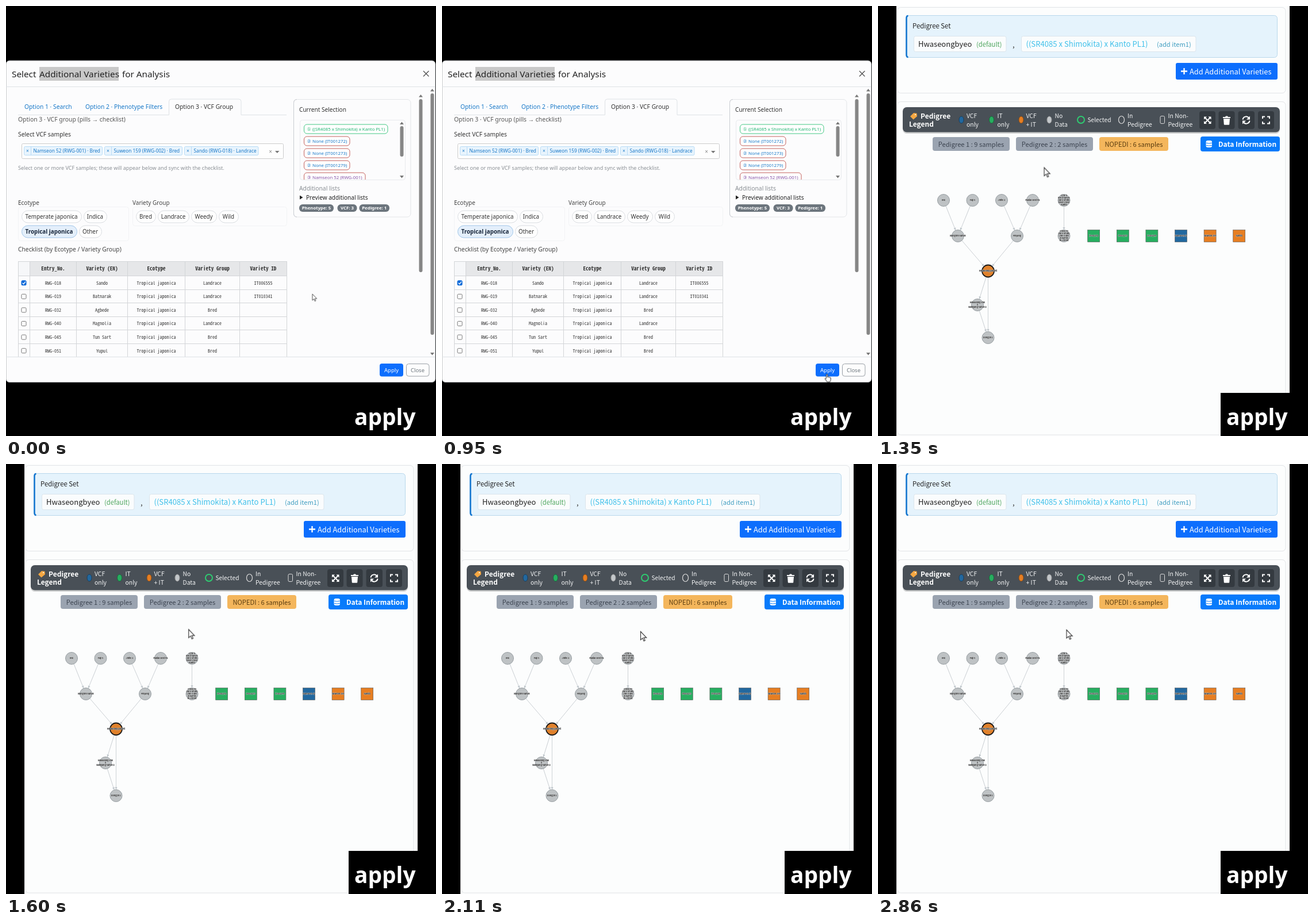
Animation, 748 px wide and 748 px high, one loop 2.88 s. Source, as an HTML page:

```html
<!DOCTYPE html>
<html lang="en">
<head>
<meta charset="utf-8">
<title>Apply varieties</title>
<style>
html, body { margin: 0; width: 100%; height: 100%; overflow: hidden; background: #000; }
svg { display: block; width: 100vw; height: 100vh; }
text { white-space: pre; }
.ui { font-family: 'Noto Sans', 'Open Sans', sans-serif; }
.kr { font-family: 'Noto Sans CJK KR', 'Noto Sans CJK JP', 'Noto Sans', sans-serif; }
.mono { font-family: 'Noto Sans Mono CJK KR', 'Noto Sans Mono CJK JP', 'Noto Sans Mono', monospace; }
#dialog, #tree, .pressed, #arrow, #hand, #pointer { animation: 2.88s linear infinite; }
#dialog { animation-name: leave; animation-timing-function: step-end; }
#tree { animation-name: enter; animation-timing-function: step-end; }
.pressed { animation-name: press; animation-timing-function: step-end; }
#arrow { animation-name: approach, arrowOff; animation-duration: 2.88s; animation-timing-function: linear, step-end; }
#hand { animation-name: handOn; animation-timing-function: step-end; }
#pointer { animation-name: wander; }
@keyframes leave { 0% { visibility: visible } 46.875%, 100% { visibility: hidden } }
@keyframes enter { 0% { visibility: hidden } 46.875%, 100% { visibility: visible } }
@keyframes press { 0% { opacity: 0 } 41.667%, 100% { opacity: 1 } }
@keyframes arrowOff { 0% { opacity: 1 } 24.306%, 100% { opacity: 0 } }
@keyframes handOn { 0% { opacity: 0 } 24.306%, 100% { opacity: 1 } }
@keyframes approach {
  0%, 3.47% { transform: translate(533px, 501px) }
  19.1% { transform: translate(678px, 597px) }
  24.306%, 100% { transform: translate(669px, 638px) }
}
@keyframes wander {
  0%, 46.875% { transform: translate(289px, 281px); animation-timing-function: ease-in-out }
  64.236% { transform: translate(346px, 294.5px); animation-timing-function: ease-in-out }
  83.681% { transform: translate(345px, 287.5px); animation-timing-function: ease-in-out }
  99.306%, 100% { transform: translate(328px, 288.5px) }
}
</style>
</head>
<body>
<svg id="stage" viewBox="0 0 748 748"></svg>
<script>
const esc = s => s.replace(/&/g, '&amp;').replace(/</g, '&lt;');

// Text is placed by the vertical middle of its capitals.
const text = (x, mid, s, size, fill = '#333', extra = '') =>
  `<text x="${x}" y="${mid + size * 0.36}" font-size="${size}" fill="${fill}" ${extra}>${esc(s)}</text>`;
const centered = (x, mid, s, size, fill, extra = '') =>
  text(x, mid, s, size, fill, 'text-anchor="middle" ' + extra);
const box = (x1, y1, x2, y2, fill = 'none', stroke = 'none', r = 0, extra = '') =>
  `<rect x="${x1}" y="${y1}" width="${x2 - x1}" height="${y2 - y1}" rx="${r}" fill="${fill}" stroke="${stroke}" ${extra}/>`;
const path = (d, stroke, width = 1, fill = 'none', extra = '') =>
  `<path d="${d}" stroke="${stroke}" stroke-width="${width}" fill="${fill}" ${extra}/>`;
const solid = (d, fill) => path(d, 'none', 0, fill);
const oval = (x, y, rx, ry, fill, stroke = 'none', width = 1) =>
  `<ellipse cx="${x}" cy="${y}" rx="${rx}" ry="${ry}" fill="${fill}" stroke="${stroke}" stroke-width="${width}"/>`;
const group = (cls, ...parts) => `<g class="${cls}">${parts.flat(9).join('')}</g>`;

const BOLD = 'font-weight="700"', MEDIUM = 'font-weight="500"';
const BLUE = '#0d6efd', LINK = '#1878c8', LINE = '#dee2e6';
const triangle = (x, y, dir) => solid(`M${x - 3.5} ${y + 2 * dir}h7l-3.5 ${-4.5 * dir}z`, '#777');
const thumb = (x1, y1, x2, y2) => box(x1, y1, x2, y2, '#868686', 'none', 3);

function header() {
  const title = fill => text(58, 118.5, 'Additional Varieties', 15.3, fill);
  return [
    box(0, 95, 747, 654.5, '#fcfcfd', '#9a9da0', 6),
    text(10, 118.5, 'Select ', 15.3, '#222'),
    box(58, 106, 196, 130, '#c8c8c8'), title('#222'),
    group('pressed', box(58, 106, 196, 130, '#3367d1'), title('#fff')),
    text(202, 118.5, 'for Analysis', 15.3, '#222'),
    path('M726 113l9.5 9.5m0-9.5l-9.5 9.5', '#555', 1.4),
    path('M0 140.5H746M0 610.5H746', LINE),
  ];
}

function filters() {
  const tag = (x1, x2, s) => [
    box(x1, 244.5, x2, 259.5, '#e8f4fd', '#b9dcf6', 2),
    path(`M${x1 + 12} 244.5v15`, '#b9dcf6'),
    centered(x1 + 6, 251.5, '×', 8.5, LINK), text(x1 + 16, 251.8, s, 8.25, LINK),
  ];
  const pill = (x1, x2, y, s, on) => [
    box(x1 + .5, y - 10.5, x2 + .5, y + 10.5, on ? '#e4effb' : '#fefefe', on ? '#9fc5e8' : '#d9dce0', 10.5),
    centered((x1 + x2) / 2, y, s, 9.85, on ? '#18263a' : '#333', on ? BOLD : ''),
  ];
  return [
    path('M21 189.5H283.5V166q0-4 4-4H405q4 0 4 4V189.5H488', LINE),
    text(32, 175.5, 'Option 1 · Search', 10.3, LINK),
    text(138, 175.5, 'Option 2 · Phenotype Filters', 10.3, LINK),
    text(294, 175.5, 'Option 3 · VCF Group', 10.3, '#333'),
    text(21, 197.5, 'Option 3 · VCF group (pills → checklist)', 10.4, '#555'),
    text(21, 223.5, 'Select VCF samples', 10.3),
    box(27.5, 239.5, 482.5, 265.5, '#fefefe', '#ccc', 2),
    tag(31.5, 167.5, 'Namseon 52 (RWG-001) · Bred'),
    tag(171.5, 306.5, 'Suweon 159 (RWG-002) · Bred'),
    tag(310.5, 439, 'Sando (RWG-018) · Landrace'),
    centered(460, 253, '×', 10, '#888'), solid('M468 252h7.5l-3.75 4z', '#777'),
    text(21, 282, 'Select one or more VCF samples; these will appear below and sync with the checklist.', 9.05, '#8a8f94'),
    text(21, 342, 'Ecotype', 10, '#444'), text(220, 342, 'Variety Group', 10, '#444'),
    box(21.5, 349.5, 213.5, 408.5, 'none', '#f2f3f5', 4), box(220.5, 349.5, 488.5, 382.5, 'none', '#f2f3f5', 4),
    pill(27, 131, 366.5, 'Temperate japonica'), pill(135, 175, 366.5, 'Indica'),
    pill(27, 123, 392.5, 'Tropical japonica', true), pill(127, 166, 392.5, 'Other'),
    pill(226, 260, 366.5, 'Bred'), pill(264, 318, 366.5, 'Landrace'),
    pill(322, 366, 366.5, 'Weedy'), pill(370, 404, 366.5, 'Wild'),
    text(21, 423, 'Checklist (by Ecotype / Variety Group)', 10.3, '#444'),
  ];
}

function table() {
  const cols = [21, 41, 122, 211, 311, 406, 488].map(x => x + .5);
  const heads = ['Entry_No.', 'Variety (EN)', 'Ecotype', 'Variety Group', 'Variety ID'];
  const rows = [
    ['018', 'Sando', 'Landrace', 'IT006555'], ['019', 'Batnarak', 'Landrace', 'IT010341'],
    ['032', 'Agbede', 'Bred', ''], ['040', 'Magnolia', 'Landrace', ''],
    ['045', 'Tun Sart', 'Bred', ''], ['051', 'Yupul', 'Bred', ''],
  ];
  const mid = i => (cols[i + 1] + cols[i + 2]) / 2;
  return group('mono',
    box(21, 444, 488, 469, '#e6e7e9'), box(21, 444, 41, 469, '#f6f7f9'),
    heads.map((s, i) => centered(mid(i), 456.5, s, 9.2, '#333', BOLD)),
    rows.map(([id, name, kind, code], r) => {
      const y = 481.7 + r * 23.6;
      return [
        ['RWG-' + id, name, 'Tropical japonica', kind, code].map((s, i) => centered(mid(i), y, s, 8, '#333')),
        box(27, y - 4, 35, y + 4, r ? '#fff' : '#0b69d8', r ? '#777' : '#0b69d8', 1.5),
        r ? '' : path(`M28.6 ${y}l2 2.1 3.2-4.3`, '#fff', 1.3),
      ];
    }),
    path('M21 444.5H488.5' + rows.map((_, r) => `M21 ${Math.round(469 + r * 23.6) + .5}H488.5`).join('') +
      cols.map(x => `M${x} 444V610`).join(''), '#d3d5d8'));
}

function selection() {
  const entry = (y, x2, mark, s, edge, color) => [
    box(518.5, y - 8, x2, y + 8, '#fefefe', edge, 5),
    centered(527, y, mark, 8, color), text(533, y, s, 7.8, color),
  ];
  const badge = (x1, x2, s) => [
    box(x1, 345, x2, 358, '#6c757d', 'none', 6),
    centered((x1 + x2) / 2, 351.5, s, 7.8, '#fff', BOLD),
  ];
  const red = '#c4625f';
  return [
    box(500.5, 162.5, 704, 367, '#fcfcfd', '#e3e5e8', 6), path('M506 162.5q-5.5 0-5.5 6V361q0 6 5.5 6', '#c9ccd1'),
    text(510, 180, 'Current Selection', 10.1),
    box(511.5, 198.5, 694.5, 302.5, 'none', '#e8eaed', 4),
    '<clipPath id="list"><rect x="511" y="198" width="184" height="104"/></clipPath><g clip-path="url(#list)">',
    entry(214, 664, '①', '((SR4085 x Shimokita) x Kanto PL1)', '#43c884', '#22b573'),
    [272, 273, 279].map((n, i) => entry(235 + i * 21, 598, '②', `None (IT001${n})`, red, LINK)),
    entry(298, 625, '③', 'Namseon 52 (RWG-001)', red, '#8550a6'),
    '</g>',
    triangle(688.5, 204, 1), thumb(685.5, 209, 691.5, 262), triangle(688.5, 297, -1),
    text(510, 317.5, 'Additional lists', 10.3, '#8a8f94'),
    solid('M511 329.5l5.5 3.5-5.5 3.5z', '#222'), text(522, 333, 'Preview additional lists', 10.05, '#222'),
    badge(510, 570, 'Phenotype: 5'), badge(576.5, 610.5, 'VCF: 3'), badge(614.5, 667, 'Pedigree: 1'),
    triangle(721.5, 156.5, 1), thumb(718.5, 162, 724.5, 463),
    triangle(741.5, 146.5, 1), thumb(738.5, 152, 744.5, 572), triangle(741.5, 605, -1),
  ];
}

const arrow = scale => `<g transform="scale(${scale})">` +
  path('M0 0V11.6L2.7 9.1 4.5 13.2 6.2 12.4 4.4 8.5H8.1Z', '#333', .9, '#fff') + '</g>';

const hand = `<g id="hand" transform="translate(665.5 639.5)">` +
  path('M3 8V1.5q1.2-1.6 2.2 0V6q1.4-.8 2 .3 1.4-.6 1.9.5 1.5-.4 1.6 1V10.500q-.5 2-1.500 4H4.500Q3 12 .8 9.300q-.5-1.800 2.200-.3', '#222', 1, '#fff') + '</g>';

function footer() {
  const apply = [
    box(650, 622, 691, 644.5, '#0957cb', 'none', 4), centered(670.5, 633.5, 'Apply', 9.5, '#fff'),
  ];
  return [
    box(650, 622, 691, 644.5, BLUE, 'none', 4), centered(670.5, 633.5, 'Apply', 9.5, '#fff'),
    group('pressed', apply),
    box(696.5, 622.5, 736, 644, '#fdfdfd', '#9aa0a6', 4), centered(716, 633.5, 'Close', 9.45, '#6c757d'),
    `<g id="arrow">${arrow(.95)}</g>`, hand,
  ];
}

function pedigreeSet() {
  return [
    box(32, 0, 716, 748, '#fcfdfd'),
    box(33.5, 2.5, 709, 151.5, 'none', '#e2e4e7', 6), box(33.5, 166.5, 709, 746, 'none', '#e2e4e7', 6),
    box(48.5, 16.5, 694.5, 89.5, '#e5f3fc', '#b9d8ec', 5),
    path('M52.500 17q-3 0-3 4V85q0 4 3 4', '#1878d0', 2.6),
    text(60, 34.5, 'Pedigree Set', 11.4, '#222', MEDIUM),
    box(62.5, 52.5, 223, 79.5, '#fafcfd', '#dbe5ec', 3), box(249.5, 52.5, 553, 79.5, '#fafcfd', '#dbe5ec', 3),
    text(70, 66.5, 'Hwaseongbyeo', 13, '#222', MEDIUM), text(171, 67, '(default)', 11.2, '#4ca55c'),
    text(234, 67, ',', 13, '#333'),
    text(257.5, 66.5, '((SR4085 x Shimokita) x Kanto PL1)', 13.1, '#3fc0ea', MEDIUM),
    text(485, 67, '(add item1)', 11.1, '#3f9dc0'),
    box(518, 99, 695, 128, BLUE, 'none', 3),
    path('M527 113.5h11m-5.500-5.500v11', '#fff', 2.3),
    text(542, 114, 'Add Additional Varieties', 12.8, '#fff', MEDIUM),
  ];
}

function toolbar() {
  const label = (x, a, b) => [text(x, 191.5, a, 10.4, '#f3f4f5', MEDIUM), text(x, 206, b, 10.4, '#f3f4f5', MEDIUM)];
  const chip = (x1, x2, s, fill, color) => [
    box(x1, 228, x2, 252, fill, 'none', 4), centered((x1 + x2) / 2, 240.5, s, 11.15, color),
  ];
  const spin = 'M-6-1A6 6 0 0 1 4.500-4';
  return [
    box(43, 178, 699, 222, '#000', 'none', 7, 'opacity=".18"'),
    box(43, 176, 699, 219.5, '#495057', 'none', 7),
    solid('M56 192l6-6 5.500.8.500 5.200-6.500 5.500z', '#f5a742'), oval(65, 189, 1, 1, '#fff'),
    text(74, 191.5, 'Pedigree', 12, '#fff', BOLD), text(54, 205.5, 'Legend', 12, '#fff', BOLD),
    oval(145, 198, 4, 6, '#22689f', '#173f61'), label(154, 'VCF', 'only'),
    oval(197.5, 198, 4, 6, '#27ae60', '#176b3a'), label(207.5, 'IT', 'only'),
    oval(249, 198, 4, 6, '#e67e22', '#8a4b12'), label(257.500, 'VCF', '+ IT'),
    oval(298, 198, 4, 6, '#c3c7ca', '#999'), label(307.5, 'No', 'Data'),
    oval(353, 198, 6, 6, 'none', '#2ecc71', 2), text(364.5, 198.5, 'Selected', 10.2, '#f3f4f5', MEDIUM),
    oval(423.5, 198, 5, 6.5, 'none', '#ddd', 1.2), label(434, 'In', 'Pedigree'),
    box(491, 191.5, 498.5, 204.5, 'none', '#ddd', 2), label(504.5, 'In Non-', 'Pedigree'),
    [[559, 587], [592.5, 620.5], [626.5, 655], [661, 689]].map(([a, b]) => box(a, 183, b, 214, '#343a40', 'none', 4)),
    path('M568.500 194l9.500 9.500m0-9.500l-9.500 9.500', '#fff', 2),
    solid('M567 192.500h5l-5 5zM579.500 192.500h-5l5 5zM567 205h5l-5-5zM579.500 205h-5l5-5z', '#fff'),
    solid('M600 193h4l1-1.500h3l1 1.500h4v2h-13zM601 196h11l-.8 10q0 .8-1 .8h-7.400q-1 0-1-.8z', '#fff'),
    ['', ' rotate(180)'].map(turn => `<g transform="translate(640.500 198.500)${turn}">` +
      path(spin, '#fff', 2) + solid('M6.500-7v6h-6z', '#fff') + '</g>'),
    path('M669 196v-3.500h4m4 0h4v3.500m0 5v3.500h-4m-4 0h-4v-3.500', '#fff', 2),
    chip(95, 229, 'Pedigree 1 : 9 samples', '#9aa3b0', '#3c4450'),
    chip(240, 374, 'Pedigree 2 : 2 samples', '#9aa3b0', '#3c4450'),
    chip(385, 505, 'NOPEDI : 6 samples', '#f4b65c', '#5a3c10'),
    box(561, 227, 699, 253, '#087bfb', 'none', 4),
    box(570.5, 234, 581, 246, '#fff', 'none', 3), path('M570.500 238.200q5.200 2 10.500 0m-10.500 4q5.200 2 10.500 0', '#087bfb', 1),
    text(592, 240.5, 'Data Information', 12, '#fff', BOLD),
  ];
}

function graph() {
  const nodes = [
    [114, 338, 'IR8'], [164.5, 338, 'Fuji 5'], [215, 338, 'Jinhe 2'], [269, 338, 'Paldal seed 41'],
    [139, 400, 'Nongrim native'], [242, 400, 'Milyang'],
    [323.500, 338, 'Line 4\nBred native\n(SR x Shim)\nBred cross\nKanto'],
    [323.500, 400, 'Cross 40\n(SR x Shim)\nLine x line\n(x Kanto)\nPL1 bred'],
    [191.5, 461, 'Hwaseong parent'], [173, 520, 'Hwaseong line\nx\nSamgang native 2'], [191.5, 577, 'Dongjin 1'],
  ];
  const edges = [[0, 4], [1, 4], [2, 5], [3, 5], [4, 8], [5, 8], [6, 7], [8, 9], [8, 10], [9, 10]];
  const edge = ([a, b]) => {
    const [x1, y1] = nodes[a], [x2, y2] = nodes[b];
    const len = Math.hypot(x2 - x1, y2 - y1), angle = Math.atan2(y2 - y1, x2 - x1) * 180 / Math.PI;
    return `<g transform="translate(${x1} ${y1}) rotate(${angle})">` +
      path(`M10 0H${len - 11}`, '#c9ced2', .9) + solid(`M${len - 10.5} 0l-4.500-2v4z`, '#c0c7cc') + '</g>';
  };
  const label = (x, y, s) => s.split('\n').map((line, i, all) =>
    centered(x, y + (i - (all.length - 1) / 2) * 4, line, 3.6, '#1b1b1b',
      BOLD + ' stroke="#d5d7d8" stroke-width=".7" paint-order="stroke"'));
  const squares = ['#27ae60', '#27ae60', '#27ae60', '#22689f', '#e67e22', '#e67e22'];
  const names = ['IT001272', 'IT001273', 'IT001279', 'Namseon 52', 'Suweon 159', 'Sando'];
  return [
    edges.map(edge),
    nodes.map(([x, y, s], i) => [
      i === 8 ? oval(x, y, 10.5, 10.5, '#e0812b', '#1b1b1b', 1.8) : oval(x, y, 10.5, 10.5, '#bec2c4', '#989fa3', 1),
      label(x, y, s),
    ]),
    squares.map((fill, i) => {
      const x = 375.2 + i * 50.6;
      return [box(x - 10.5, 389.5, x + 10.5, 410.5, fill, '#555', 0, 'stroke-width=".6"'), label(x, 400, names[i])];
    }),
  ];
}

const caption = group('ui', text(606, 715.2, 'apply', 38.8, '#fff', BOLD));

document.getElementById('stage').innerHTML = [
  box(0, 0, 748, 748, '#000'),
  '<g id="dialog">', group('ui', header(), filters(), table(), selection(), footer()), '</g>',
  '<g id="tree">', group('kr', pedigreeSet(), toolbar(), graph()),
  `<g id="pointer">${arrow(1.25)}</g>`, box(596, 673, 748, 748, '#000'), '</g>',
  caption,
].join('');
</script>
</body>
</html>
```
